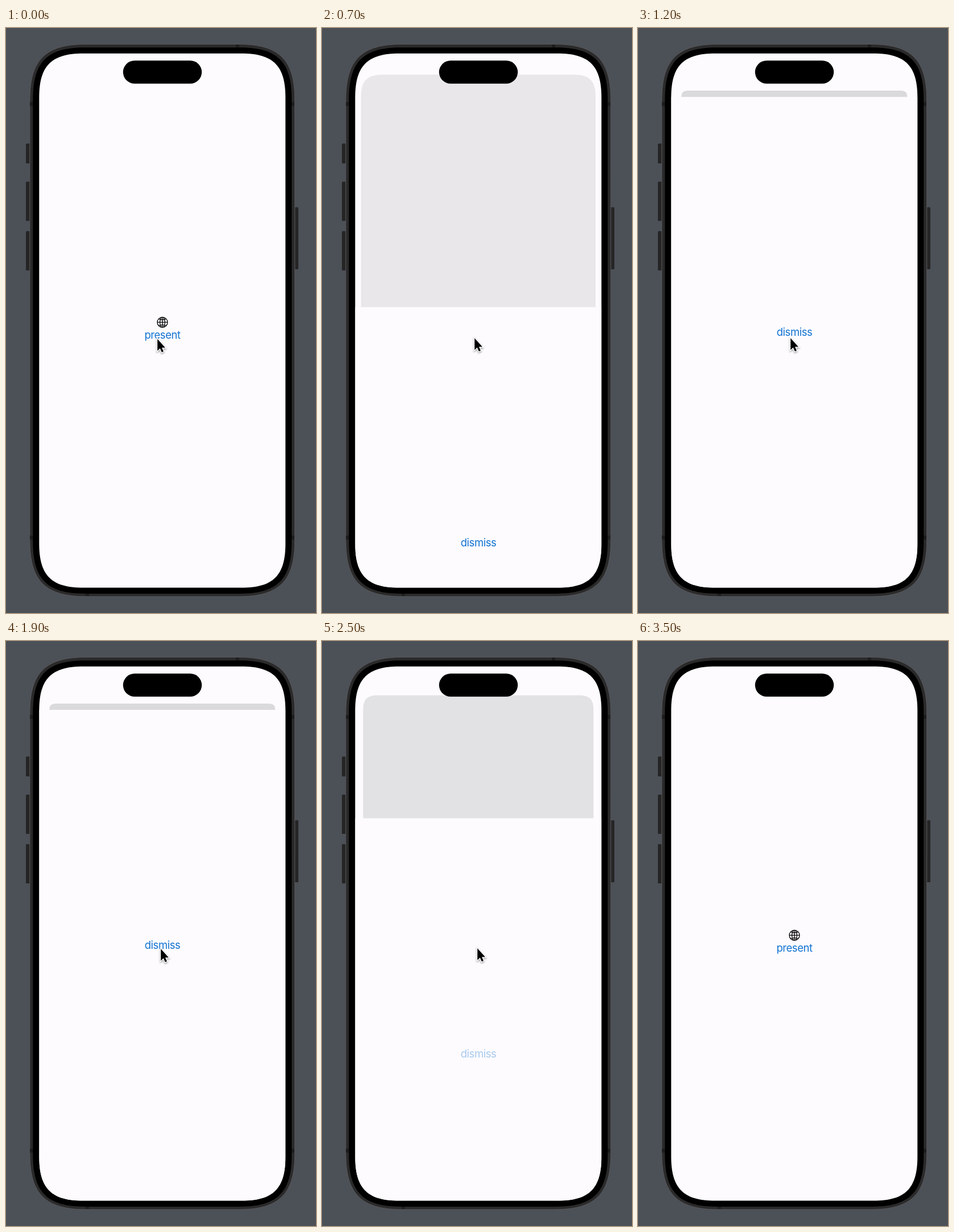
An HTML page with a canvas for the animation above (4200 ms loop, 545 by 1028 pixels).

```html
<!DOCTYPE html>
<html lang="en">
<head>
<meta charset="utf-8">
<title>Sheet presentation</title>
<style>
  html, body { margin: 0; width: 100%; height: 100%; overflow: hidden; background: #4c5057; }
  canvas { display: block; }
</style>
</head>
<body>
<canvas id="stage" width="545" height="1028"></canvas>
<script>
const ctx = document.getElementById('stage').getContext('2d');
const LOOP = 4200, STEP = 100;
const SCREEN = { x: 58.3, y: 44.7, w: 433, h: 938.8, r: 60.6 };
const BOTTOM = SCREEN.y + SCREEN.h;
const SHEET_TOP = 121;
const PAPER = '#fdfbfe', BLUE = '#1273d1';

// Each entry holds from its time until the next one.
const CURSOR = [[0, 265, 544], [100, 267, 542.5], [1800, 269, 540.5], [1900, 271, 538.5],
  [2000, 272, 537.5], [3400, 290, 538.5], [3500, null, null]];
const PRESENT_ALPHA = [[0, 1], [500, 0.25], [600, 0.4], [700, 1]];
const DISMISS_ALPHA = [[0, 1], [2000, 0.4], [2100, 0.25], [2400, 0.3], [2500, 0.36]];

const held = (keys, t) => keys.filter(k => k[0] <= t).pop().slice(1);
const mix = (a, b, p) => a + (b - a) * p;

// Fraction of the way left for a critically damped spring.
function springLeft(t, start, rate) {
  const u = Math.max(0, t - start) / 1000 * rate;
  return (1 + u) * Math.exp(-u);
}

function sheetProgress(t) {
  return t < 2400 ? 1 - springLeft(t, 597.4, 18.7) : springLeft(t, 2458, 21);
}

function smoothRect(x, y, w, h, r) {
  const e = Math.min(r * 1.28, w / 2, h / 2), c = (2.343 * r - e) / 3;
  const X = x + w, Y = y + h;
  ctx.beginPath();
  ctx.moveTo(x + e, y);
  ctx.lineTo(X - e, y);
  ctx.bezierCurveTo(X - c, y, X, y + c, X, y + e);
  ctx.lineTo(X, Y - e);
  ctx.bezierCurveTo(X, Y - c, X - c, Y, X - e, Y);
  ctx.lineTo(x + e, Y);
  ctx.bezierCurveTo(x + c, Y, x, Y - c, x, Y - e);
  ctx.lineTo(x, y + e);
  ctx.bezierCurveTo(x, y + c, x + c, y, x + e, y);
  ctx.closePath();
}

function fillSmooth(color, ...box) {
  smoothRect(...box);
  ctx.fillStyle = color;
  ctx.fill();
}

function fillRound(color, x, y, w, h, r) {
  ctx.beginPath();
  ctx.roundRect(x, y, w, h, r);
  ctx.fillStyle = color;
  ctx.fill();
}

function drawPhone() {
  ctx.fillStyle = '#4c5057';
  ctx.fillRect(0, 0, 545, 1028);
  for (const [x, y, h] of [[35, 203, 35], [35, 270, 69], [35, 357, 69], [507, 315, 109]]) {
    fillRound('#252526', x, y, 7, h, 1.5);
  }
  fillSmooth('#2a2a2b', 41.8, 28.5, 466, 970.5, 77);
  ctx.strokeStyle = '#59595b';
  ctx.lineWidth = 1;
  ctx.stroke();
  ctx.fillStyle = '#1d1d1e';
  for (const y of [130, 892]) {
    ctx.fillRect(42, y, 6, 7);
    ctx.fillRect(501, y, 6, 7);
  }
  ctx.fillRect(404, 29, 6, 6);
  ctx.fillRect(140, 992, 6, 6);
  fillSmooth('#000', 47.3, 34.2, 455, 959.8, 71);
}

function drawLabel(text, baseline, alpha) {
  ctx.save();
  ctx.globalAlpha = alpha;
  ctx.fillStyle = BLUE;
  ctx.font = '18.5px Inter, sans-serif';
  ctx.letterSpacing = '-0.45px';
  ctx.textAlign = 'center';
  ctx.fillText(text, 275, baseline);
  ctx.restore();
}

function drawGlobe(x, y) {
  const r = 9;
  ctx.save();
  ctx.translate(x, y);
  ctx.strokeStyle = '#000';
  ctx.lineWidth = 1.3;
  ctx.beginPath();
  ctx.arc(0, 0, r, 0, 7);
  ctx.moveTo(4.4, 0);
  ctx.ellipse(0, 0, 4.4, r, 0, 0, 7);
  ctx.moveTo(0, -r);
  ctx.lineTo(0, r);
  ctx.moveTo(-r, 0);
  ctx.lineTo(r, 0);
  for (const side of [-1, 1]) {
    ctx.moveTo(-6.6, side * 6);
    ctx.quadraticCurveTo(0, side * 3, 6.6, side * 6);
  }
  ctx.stroke();
  ctx.restore();
}

function drawCard(p, alpha) {
  const inset = 18 * p, top = mix(SCREEN.y, 110, p), scale = 1 - 2 * inset / SCREEN.w;
  ctx.save();
  ctx.translate(SCREEN.x + inset, top);
  ctx.scale(scale, scale);
  ctx.translate(-SCREEN.x, -SCREEN.y);
  drawGlobe(275, 517.2);
  drawLabel('present', 546, alpha);
  ctx.restore();
  fillSmooth(`rgba(0, 0, 0, ${0.138 * p})`, SCREEN.x + inset, top,
    SCREEN.w * scale, SCREEN.h * scale, mix(SCREEN.r, 10, p) * scale);
}

function drawSheet(p, alpha) {
  const top = mix(BOTTOM, SHEET_TOP, p);
  ctx.fillStyle = PAPER;
  ctx.fillRect(SCREEN.x, top, SCREEN.w, BOTTOM - top);
  drawLabel('dismiss', top + 420, alpha);
}

function drawCursor(x, y) {
  const arrow = new Path2D('M0 0V20.6L4.6 16.4L7.6 23.2L10.8 21.8L7.8 15.2H13.8Z');
  ctx.save();
  ctx.translate(x + 1.2, y + 2.6);
  ctx.lineJoin = 'miter';
  ctx.lineWidth = 2.8;
  ctx.strokeStyle = '#fff';
  ctx.shadowColor = 'rgba(0, 0, 0, 0.4)';
  ctx.shadowBlur = 3;
  ctx.shadowOffsetY = 1.5;
  ctx.stroke(arrow);
  ctx.shadowColor = 'transparent';
  ctx.fillStyle = '#000';
  ctx.fill(arrow);
  ctx.restore();
}

function draw(now) {
  const t = Math.floor(now % LOOP / STEP) * STEP;
  const p = sheetProgress(t);
  drawPhone();
  ctx.save();
  fillSmooth(PAPER, SCREEN.x, SCREEN.y, SCREEN.w, SCREEN.h, SCREEN.r);
  ctx.clip();
  drawCard(p, held(PRESENT_ALPHA, t)[0]);
  drawSheet(p, held(DISMISS_ALPHA, t)[0]);
  ctx.restore();
  fillRound('#000', 205.8, 57.2, 138.4, 40.6, 20.3);
  const [x, y] = held(CURSOR, t);
  if (x !== null) drawCursor(x, y);
}

const start = performance.now();
function tick() {
  draw(performance.now() - start);
  requestAnimationFrame(tick);
}
tick();
</script>
</body>
</html>
```
